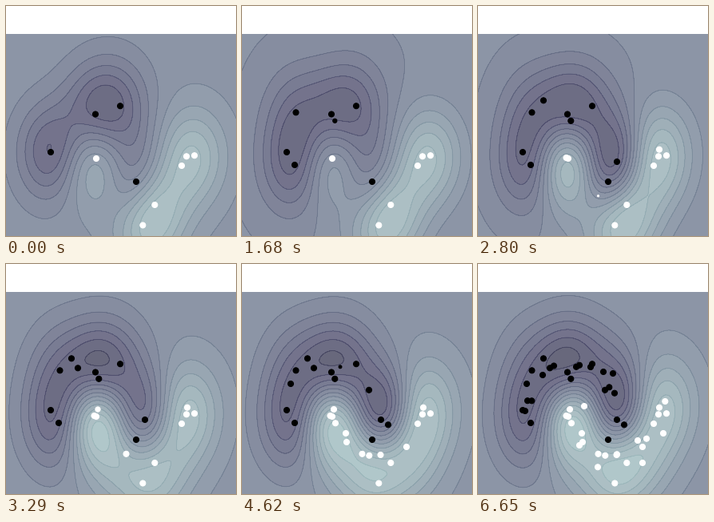
Animation of 288 by 288 pixels, one loop 7350 ms. Source, as a matplotlib script:

```python
import numpy as np
import matplotlib.pyplot as plt
from matplotlib.animation import FuncAnimation

SIZE, DPI = 288, 72
AXES_TOP = 0.88
XLIM, YLIM = (-2, 3), (-1, 2)
STEPS, HOLD, INTERVAL = 95, 10, 70
START, TOTAL = 10, 50
GAMMA = 2.0
LEVELS = np.linspace(-3, 3, 30)

# Samples in order of arrival, in stage pixels, as runs of one class.
RUNS = [
    ("black", [(56, 183), (112, 135.5), (143, 125.2), (163, 220)]),
    ("white", [(113, 191), (226, 188.3), (236, 187.2), (220, 200),
               (186.3, 249), (171.3, 274.5)]),
    ("black", [(66, 199), (67.5, 133.3), (116.3, 143.8)]),
    ("white", [(227, 179.7), (110.5, 190)]),
    ("black", [(82, 118.3), (174, 195)]),
    ("white", [(150.5, 237.8)]),
    ("black", [(90, 130.3)]),
    ("white", [(115, 182), (130, 212), (159.3, 239.8)]),
    ("black", [(61, 150), (183, 201.3)]),
    ("white", [(117, 199.3), (206, 229)]),
    ("black", [(159, 157.8)]),
    ("white", [(131, 223), (173.5, 239)]),
    ("black", [(123, 128.8), (169, 137), (67.3, 171.3), (171, 161.7)]),
    ("white", [(133, 178)]),
    ("black", [(164.3, 154.3)]),
    ("white", [(174, 238.3), (234.3, 172)]),
    ("black", [(95, 127.5), (59, 184)]),
    ("white", [(232, 212), (150, 254.3)]),
    ("black", [(157, 135), (81, 139)]),
    ("white", [(211, 218.7), (127, 227)]),
    ("black", [(62, 171.2), (127, 126.7)]),
    ("white", [(200, 221), (206, 249)]),
    ("black", [(141, 129)]),
]

COLORS = np.array([c for c, pts in RUNS for _ in pts])
PIXELS = np.array([p for _, pts in RUNS for p in pts], float)
Y = np.where(COLORS == "white", 1.0, -1.0)


def to_data(px):
    x = XLIM[0] + px[:, 0] / SIZE * (XLIM[1] - XLIM[0])
    y = YLIM[0] + (SIZE - px[:, 1]) / (SIZE * AXES_TOP) * (YLIM[1] - YLIM[0])
    return np.column_stack([x, y])


def rbf(a, b):
    d2 = ((a[:, None, :] - b[None, :, :]) ** 2).sum(axis=2)
    return np.exp(-GAMMA * d2)


def fit_svm(weights, tol=1e-3, max_iter=4000):
    """Weighted RBF support vector machine, solved pair by pair."""
    lo = np.minimum(0, Y * weights)
    hi = np.maximum(0, Y * weights)
    coef = np.zeros(len(Y))
    resid = Y.copy()
    for _ in range(max_iter):
        up = np.where(coef < hi - 1e-10, resid, -np.inf)
        down = np.where(coef > lo + 1e-10, resid, np.inf)
        i, j = up.argmax(), down.argmin()
        gap = up[i] - down[j]
        if gap < tol:
            break
        curve = max(2 - 2 * KERNEL[i, j], 1e-9)
        step = min(gap / curve, hi[i] - coef[i], coef[j] - lo[j])
        coef[i] += step
        coef[j] -= step
        resid -= step * (KERNEL[i] - KERNEL[j])
    return coef, (up[i] + down[j]) / 2


X = to_data(PIXELS)
KERNEL = rbf(X, X)
GX, GY = np.meshgrid(np.linspace(*XLIM, 110), np.linspace(*YLIM, 100))
GRID_KERNEL = rbf(np.column_stack([GX.ravel(), GY.ravel()]), X)

fig = plt.figure(figsize=(SIZE / DPI, SIZE / DPI), dpi=DPI, facecolor="white")
ax = fig.add_axes([0, 0, 1, AXES_TOP])


def draw(frame):
    t = min(frame / STEPS, 1)
    count = START + (TOTAL - START) * t ** 2
    weights = np.clip(count - np.arange(TOTAL), 0, 1)
    coef, bias = fit_svm(weights)
    field = (GRID_KERNEL @ coef + bias).reshape(GX.shape)

    ax.clear()
    ax.axis("off")
    style = dict(levels=LEVELS, cmap="bone", alpha=0.8)
    ax.contourf(GX, GY, field, **style)
    ax.contour(GX, GY, field, linewidths=0.8, **style)
    on = weights > 0
    ax.scatter(X[on, 0], X[on, 1], s=50 * weights[on], c=COLORS[on], zorder=3)
    ax.set_xlim(*XLIM)
    ax.set_ylim(*YLIM)
    return []


anim = FuncAnimation(fig, draw, frames=STEPS + HOLD, init_func=lambda: [],
                     interval=INTERVAL, repeat=True, repeat_delay=0)
plt.show()
```
